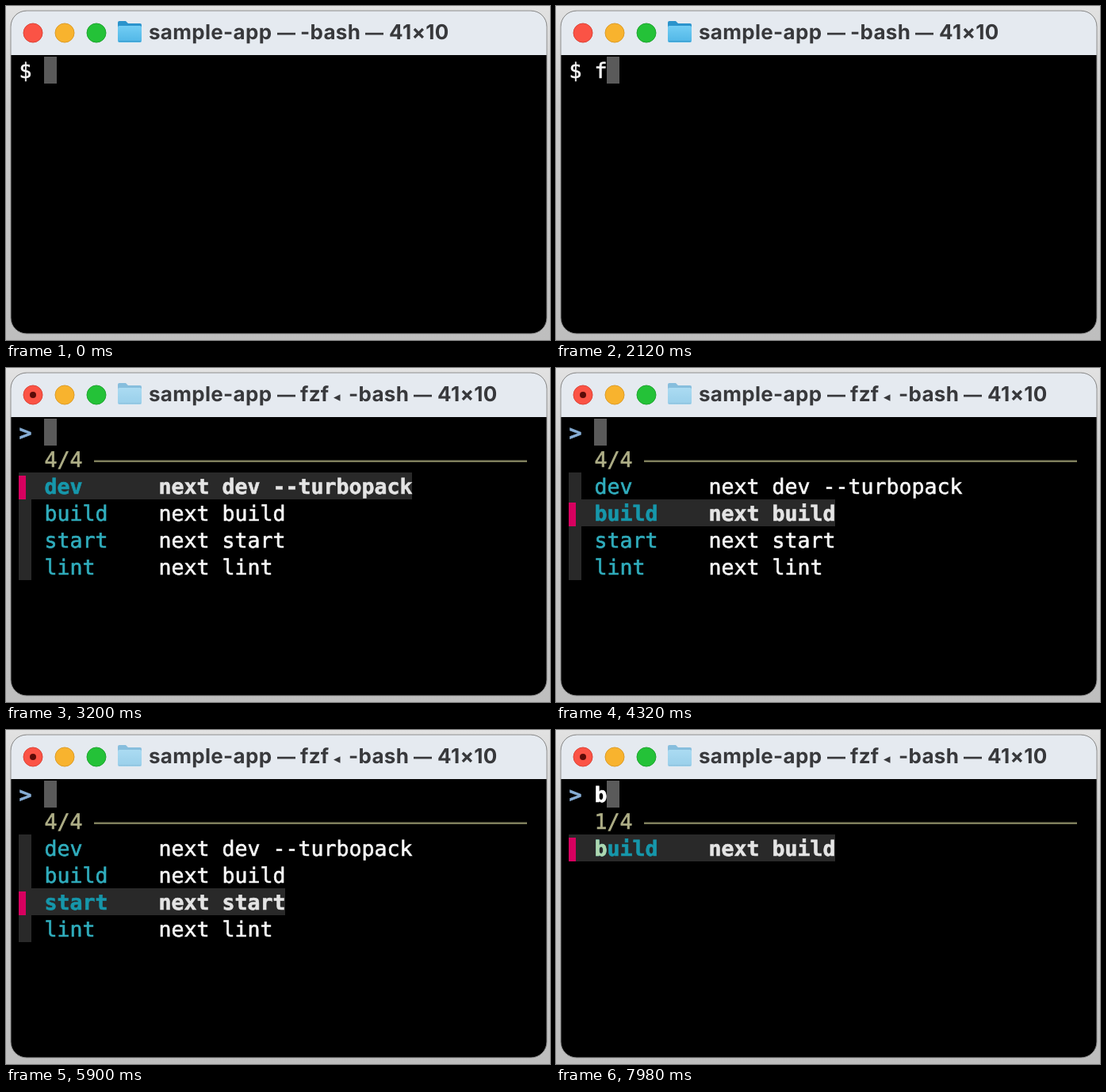
Recreate the animation shown at these times as an HTML page. Size 686 px wide and 422 px high, loop 8 s.

```html
<!DOCTYPE html>
<html>
<head>
<meta charset="utf-8">
<style>
html, body { margin: 0; width: 100%; height: 100%; overflow: hidden; }
svg { display: block; width: 686px; height: 422px; text-rendering: geometricPrecision; }
text { white-space: pre; }
.mono { font: 26.58px "DejaVu Sans Mono", monospace; stroke-width: .6px; }
.bold { font-weight: bold; }
.title { font: 700 26px Inter, sans-serif; letter-spacing: .3px; fill: #38393c; }
.dash { font-size: 23px; }
.arrow { font: 17px "DejaVu Sans", sans-serif; }
</style>
</head>
<body>
<svg viewBox="0 0 686 422">
  <defs>
    <linearGradient id="desk" x2="0" y2="1">
      <stop offset="0" stop-color="#e2e2e2"/>
      <stop offset=".3" stop-color="#cacaca"/>
      <stop offset="1" stop-color="#bebebe"/>
    </linearGradient>
    <linearGradient id="front" x2="0" y2="1">
      <stop offset="0" stop-color="#72cdf4"/>
      <stop offset="1" stop-color="#50b6e6"/>
    </linearGradient>
    <clipPath id="frame"><rect x="6" y="6" width="676" height="408" rx="20"/></clipPath>
  </defs>
  <rect width="686" height="422" fill="url(#desk)"/>
  <g clip-path="url(#frame)">
    <rect width="686" height="422"/>
    <rect width="686" height="62" fill="#e5eaf0"/>
  </g>
  <rect x="6" y="6" width="676" height="408" rx="20" fill="none" stroke="#8e8e8e"/>
  <circle cx="34" cy="34" r="12" fill="#fb5345" stroke="#dc4438"/>
  <circle cx="74" cy="34" r="12" fill="#f8b32e" stroke="#dc9c28"/>
  <circle cx="114" cy="34" r="12" fill="#24c238" stroke="#1fa530"/>
  <g id="folder">
    <path d="M141 23V21Q141 19 143 19H151L154 22H169Q171 22 171 24V30H141Z" fill="#2b93cc"/>
    <rect x="141" y="25" width="30" height="21" rx="2" fill="url(#front)"/>
    <path d="M142 44.5H170" stroke="#3d9ccc"/>
  </g>
  <g id="view"></g>
</svg>
<script>
const CELL = 16, ROW = 34, LOOP = 8000;
const scripts = [
  ["dev", "next dev --turbopack"],
  ["build", "next build"],
  ["start", "next start"],
  ["lint", "next lint"]
];
// Key presses: time in ms and the state that follows
const steps = [
  { at: 0, typed: "" },
  { at: 1500, typed: "f" },
  { at: 2660, list: true, typed: "", pick: 0 },
  { at: 3760, list: true, typed: "", pick: 1 },
  { at: 5000, list: true, typed: "", pick: 2 },
  { at: 6200, list: true, typed: "", pick: 1 },
  { at: 6520, list: true, typed: "", pick: 0 },
  { at: 7600, list: true, typed: "b", pick: 0 }
];
const view = document.getElementById("view");
const folder = document.getElementById("folder");

const colX = col => 16 + col * CELL;
const rowY = row => 64 + row * ROW;
const rect = (x, y, w, h, fill) =>
  `<rect x="${x}" y="${y}" width="${w}" height="${h}" fill="${fill}"/>`;
const mono = (col, row, str, color, bold) =>
  `<text class="mono${bold ? " bold" : ""}" x="${colX(col) + .5}" y="${rowY(row) + 27}" fill="${color}" stroke="${color}">${str}</text>`;
const title = (x, str, kind = "") => `<text class="title ${kind}" x="${x}" y="42">${str}</text>`;
const dash = x => title(x, "—", "dash");

function titleBar(list) {
  const start = title(180, "sample-app") + dash(342);
  if (!list) return start + title(371, "-bash") + dash(453) + title(483, "41×10");
  return start + title(371, "fzf") + title(413, "◂", "arrow") +
    title(432, "-bash") + dash(514) + title(544, "41×10") +
    `<circle cx="34" cy="34" r="4" fill="#5c0c08"/>`;
}

function item([name, command], row, picked, match) {
  const y = rowY(row), width = picked ? (11 + command.length) * CELL : CELL;
  const color = picked ? "#1697ab" : "#30adbd";
  let out = rect(16, y, width, ROW, "#292929");
  if (picked) out += rect(16, y + 4, 9, 30, "#d7005f");
  out += mono(2, row, name, color, picked);
  if (match) out += mono(2, row, match, "#afd7af", true);
  return out + mono(11, row, command, picked ? "#e4e4e4" : "#f8f8f8", picked);
}

function draw({ list, typed, pick }) {
  let out = titleBar(list) + rect(colX(2 + typed.length), 64, CELL, ROW, "#5a5a5a");
  if (list) {
    const found = scripts.filter(s => s[0].startsWith(typed));
    out += mono(0, 0, "&gt;", "#87afd7", true) + mono(2, 0, typed, "#fff", true) +
      mono(2, 1, `${found.length}/4`, "#afaf87") +
      rect(111, 116.5, 546, 2.5, "#7f7f5c") +
      found.map((s, i) => item(s, i + 2, i === pick, typed)).join("");
  } else {
    out += mono(0, 0, "$ " + typed, "#f8f8f8");
  }
  view.innerHTML = out;
  folder.setAttribute("opacity", list ? 0.5 : 1);
}

let shown;
const begin = performance.now();
function tick() {
  const t = (performance.now() - begin) % LOOP;
  const step = steps.findLast(s => s.at <= t);
  if (step !== shown) draw(shown = step);
  requestAnimationFrame(tick);
}
tick();
</script>
</body>
</html>
```
